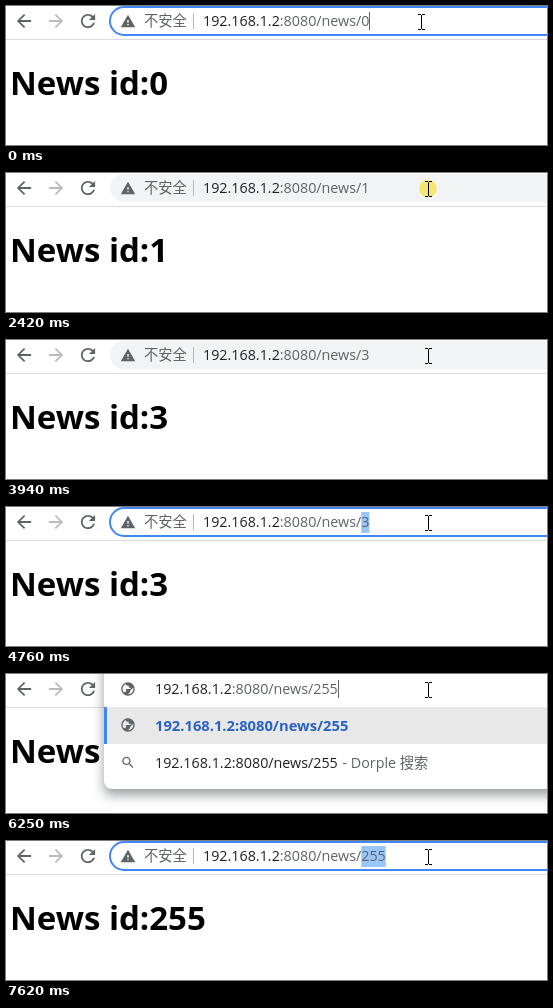
Animation of 541x139 px, one loop 8000 ms. Source, as an HTML page with a canvas:

```html
<!DOCTYPE html>
<html lang="zh">
<head>
<meta charset="utf-8">
<title>News</title>
<style>
html, body { margin: 0; width: 541px; height: 139px; overflow: hidden; background: #fff; }
canvas { display: block; }
</style>
</head>
<body>
<canvas id="stage" width="541" height="139"></canvas>
<script>
const ctx = document.getElementById('stage').getContext('2d', { alpha: false });
const LOOP = 8000, GRAY = '#5f6368', DARK = '#202124', BLUE = '#4285f4';
const FACE = '"Open Sans", "Noto Sans CJK SC", "Noto Sans CJK", sans-serif';
const HOST = '192.168.1.2', PATH = ':8080/news/';

// 24-unit icon outlines
const icons = {
  back: 'M20 11H7.83l5.59-5.59L12 4l-8 8 8 8 1.41-1.41L7.83 13H20v-2z',
  reload: 'M17.65 6.35C16.2 4.9 14.21 4 12 4c-4.42 0-7.99 3.58-7.99 8s3.57 8 7.99 8c3.73 0 6.84-2.55 7.73-6h-2.08c-.82 2.33-3.04 4-5.65 4-3.31 0-6-2.69-6-6s2.69-6 6-6c1.66 0 3.14.69 4.22 1.78L13 11h7V4z',
  stop: 'M19 6.41 17.59 5 12 10.59 6.41 5 5 6.41 10.59 12 5 17.59 6.41 19 12 13.41 17.59 19 19 17.59 13.41 12z',
  warning: 'M1 21h22L12 2 1 21zm12-3h-2v-2h2v2zm0-4h-2v-4h2v4z',
  globe: 'M12 2C6.48 2 2 6.48 2 12s4.48 10 10 10 10-4.48 10-10S17.52 2 12 2zm-1 17.93c-3.95-.49-7-3.85-7-7.93 0-.62.08-1.21.21-1.79L9 15v1c0 1.1.9 2 2 2v1.93zm6.9-2.54c-.26-.81-1-1.39-1.9-1.39h-1v-3c0-.55-.45-1-1-1H8v-2h2c.55 0 1-.45 1-1V7h2c1.1 0 2-.9 2-2v-.41c2.93 1.19 5 4.06 5 7.41 0 2.08-.8 3.97-2.1 5.39z',
  search: 'M15.5 14h-.79l-.28-.27C15.41 12.59 16 11.11 16 9.5 16 5.91 13.09 3 9.5 3S3 5.91 3 9.5 5.91 16 9.5 16c1.61 0 3.09-.59 4.23-1.57l.27.28v.79l5 4.99L20.49 19l-4.99-5zm-6 0C7.01 14 5 11.99 5 9.5S7.01 5 9.5 5 14 7.01 14 9.5 11.99 14 9.5 14z'
};
for (const name in icons) icons[name] = new Path2D(icons[name]);

// Timeline: each step changes part of the previous state
const steps = [];
let last = { mode: 'edit', url: '0', page: '0', sel: '', x: 415, click: false, shade: 1 };
const at = (t, change) => steps.push(last = { ...last, t, ...change });

const focus = t => {
  at(t, { click: true });
  at(t + 70, { mode: 'edit', sel: 'all' });
  at(t + 140, { click: false });
};
const pick = t => {
  at(t, { sel: 'last', click: true });
  at(t + 130, { click: false });
};
const type = (t, url) => {
  at(t, { mode: 'type', url, sel: '', shade: 0.5 });
  at(t + 70, { shade: 1 });
};
const load = (t, end) => {
  at(t, { mode: 'load' });
  at(t + 90, { page: last.url });
  at(end - 70, { mode: 'idle' });
};

at(0, {});
at(70, { x: 418 });
at(140, { x: 422, click: true });
at(200, { sel: 'all' });
at(270, { sel: 'last' });
at(340, { click: false });
at(940, { url: '1', sel: '' });
type(1010, '1');
load(1410, 1680);
focus(2420);
at(2620, { click: true });
pick(2660);
type(3250, '3');
load(3670, 3940);
focus(4290);
pick(4630);
type(5830, '2');
at(6100, { url: '25' });
at(6250, { url: '255' });
load(6520, 6860);
focus(7210);
pick(7490);

function rect(x, y, w, h, color) {
  ctx.fillStyle = color;
  ctx.fillRect(x, y, w, h);
}

function pill(x, y, w, h, r) {
  ctx.beginPath();
  ctx.roundRect(x, y, w, h, r);
}

// Returns the x position where the text ends
function text(str, x, y, color, size = 14.3, weight = 400) {
  ctx.font = `${weight} ${size}px ${FACE}`;
  ctx.fillStyle = color;
  ctx.fillText(str, x, y);
  return x + ctx.measureText(str).width;
}

function icon(name, x, y, scale, color = GRAY, flip = 1) {
  ctx.save();
  ctx.translate(x, y);
  ctx.scale(scale * flip, scale);
  ctx.translate(-12, -12);
  ctx.fillStyle = color;
  ctx.fill(icons[name], 'evenodd');
  ctx.restore();
}

const globe = y => icon('globe', 122, y, 0.67, GRAY, -1);

function address(s, x) {
  ctx.font = `400 14.3px ${FACE}`;
  const width = str => ctx.measureText(str).width;
  const tail = x + width(HOST) + width(PATH), end = tail + width(s.url);
  if (s.sel) {
    const from = s.sel === 'all' ? x : tail;
    rect(from, 5, end - from, 21, '#99c6f9');
  }
  text(PATH + s.url, text(HOST, x, 20, DARK), 20, GRAY);
  if (!s.sel && (s.mode === 'edit' || s.mode === 'type')) rect(Math.round(end), 6, 1, 18, GRAY);
}

function field(s) {
  const focused = s.mode === 'edit';
  pill(104, 1, 600, 28, 14);
  ctx.fillStyle = focused ? '#fff' : '#f1f3f4';
  ctx.fill();
  if (focused) {
    ctx.strokeStyle = BLUE;
    ctx.lineWidth = 2;
    ctx.stroke();
  }
  if (s.mode === 'load') {
    globe(15);
    address(s, 149);
  } else {
    icon('warning', 122, 15.4, 0.66);
    text('不安全', 138, 20, GRAY);
    rect(187, 7, 1, 16, '#b4b7ba');
    address(s, 197);
  }
}

function popup(s) {
  ctx.save();
  ctx.shadowColor = `rgba(50, 60, 62, ${0.5 * s.shade})`;
  ctx.shadowBlur = 12;
  ctx.shadowOffsetY = 6;
  pill(98, -20, 600, 135, 8);
  ctx.fillStyle = '#fff';
  ctx.fill();
  ctx.restore();

  rect(98, 33, 443, 37, '#e8e8e8');
  rect(98, 33, 3, 37, BLUE);
  globe(15);
  globe(51);
  icon('search', 122, 88.5, 0.64);

  const url = HOST + PATH + s.url;
  address(s, 149);
  text(url, 149, 57, '#2962c4', 14.75, 700);
  text(' - Dorple 搜索', text(url, 149, 94, DARK) + 1, 94, GRAY);
}

function pointer(s) {
  if (s.click) {
    ctx.fillStyle = 'rgba(246, 224, 50, .7)';
    ctx.beginPath();
    ctx.arc(s.x, 15.5, 8.7, 0, 7);
    ctx.fill();
  }
  rect(s.x, 9, 1, 14, '#000');
  for (const y of [8, 23]) {
    rect(s.x - 3, y, 3, 1, '#000');
    rect(s.x + 1, y, 3, 1, '#000');
  }
}

function draw(now) {
  const t = now % LOOP;
  const s = steps.findLast(step => step.t <= t);
  rect(0, 0, 541, 139, '#fff');
  rect(0, 33, 541, 1, '#d9dbde');
  text('News id:' + s.page, 4, 89, '#000', 33, 700);
  icon('back', 18, 15, 0.89);
  icon('back', 50, 15, 0.89, '#b9bbbe', -1);
  icon(s.mode === 'load' ? 'stop' : 'reload', 82, 15, 0.89);
  if (s.mode === 'type') popup(s);
  else field(s);
  pointer(s);
}

const start = performance.now();
function tick() {
  draw(performance.now() - start);
  requestAnimationFrame(tick);
}
tick();
</script>
</body>
</html>
```
